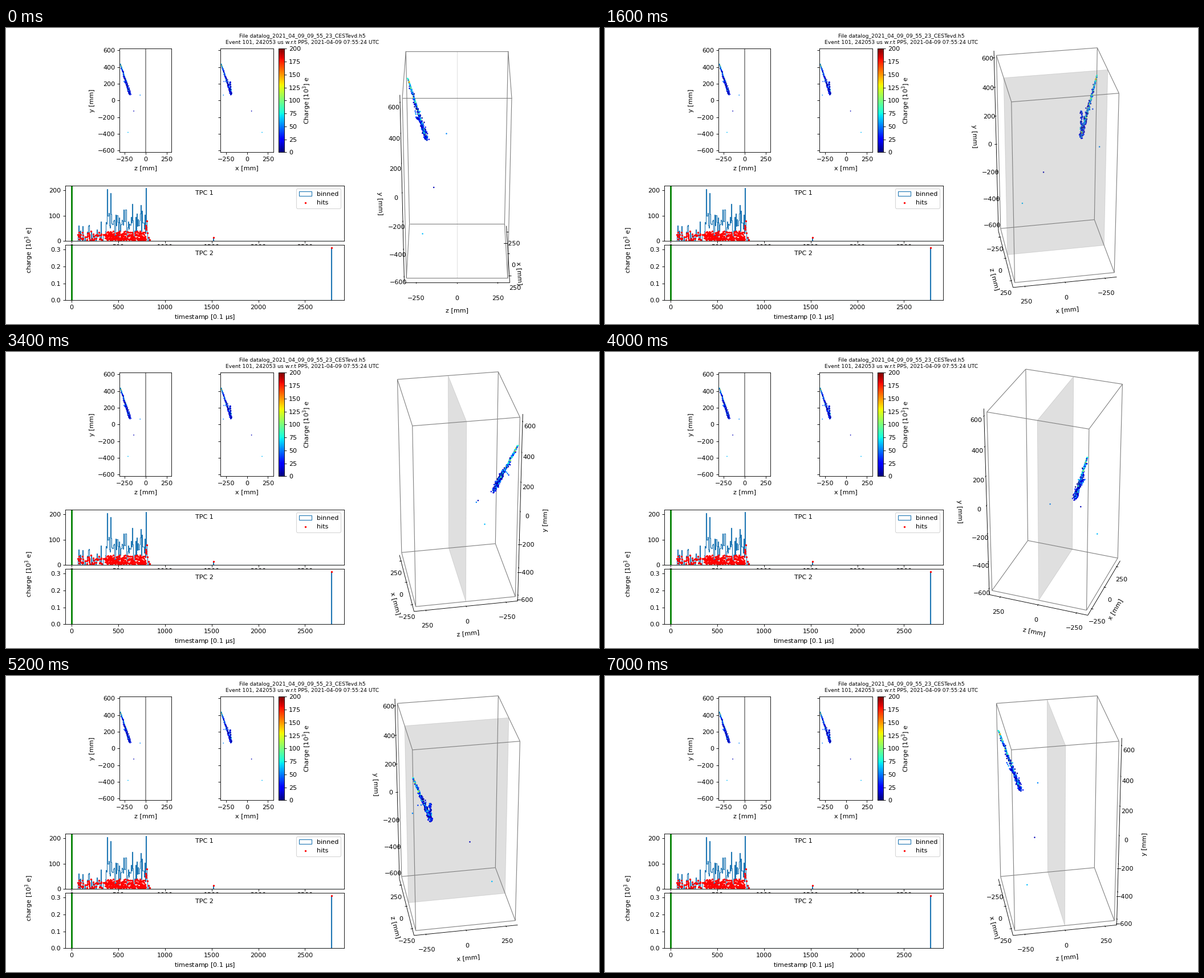
Animation, 1040 px wide and 520 px high, one loop 7.2 s. Source, as a matplotlib script:

```python
import numpy as np
import matplotlib.pyplot as plt
from matplotlib.animation import FuncAnimation
from matplotlib.collections import LineCollection
from matplotlib.patches import Polygon

W, H, DPI = 1040, 520, 80
FRAMES, INTERVAL = 36, 200
plt.rcParams["font.family"] = "DejaVu Sans"
rng = np.random.default_rng(101)

# World axes are ordered (x, z, y), in mm; y points up on the stage.
HALF = np.array([310.38, 310.38, 620.76])
EDGE = HALF * 25 / 24
DELTA = HALF / 6
CAMERA, FOCAL = 8311.0, 2389.2
CENTER = np.array([791.0, 241.0])
ELEV = np.radians(30)
PAD = 0.0588
TICKS = [range(-250, 251, 250), range(-250, 251, 250), range(-600, 601, 200)]
NAMES = ["x [mm]", "z [mm]", "y [mm]"]
LABEL_PAD = [25, 25, 41]
TRACK_TOP, TRACK_END = np.array([-309, -301, 436]), np.array([-188, -187, 74])

fig = plt.figure(figsize=(W / DPI, H / DPI), dpi=DPI, facecolor="white")


def pixel_axes(left, top, right, bottom):
    return fig.add_axes([left / W, 1 - bottom / H,
                         (right - left) / W, (bottom - top) / H])


def pixel_text(x, y, text, **style):
    fig.text(x / W, 1 - y / H, text, ha="center", va="center", **style)


def along_track(s, spread):
    s = s[:, None]
    jitter = rng.normal(0, 1, (len(s), 3)) * spread * (0.4 + 0.6 * s)
    return TRACK_TOP + s * (TRACK_END - TRACK_TOP) + jitter


def make_hits():
    """Return hit positions (x, z, y) and charges for the event."""
    core = along_track(np.linspace(0, 1, 170), 3)
    halo = along_track(rng.uniform(0, 1, 170) ** 0.5, 7)
    t = rng.uniform(0, 1, 75) ** 1.4
    branch = np.column_stack([-203 + 12 * t, -253 + 58 * np.sqrt(t), 222 - 145 * t])
    branch += rng.normal(0, 3, branch.shape)
    spray = np.linspace((-277, -259, 228), (-238, -254, 226), 3)
    strays = [(-283, -66, 65), (54, -142, -126), (180, -211, -382)]
    charge = np.concatenate([rng.gamma(6, 12, 170), rng.gamma(1.6, 12, 170),
                             rng.gamma(1.5, 20, 75), rng.uniform(30, 60, 3),
                             [52, 10, 62]])
    return np.vstack([core, halo, branch, spray, strays]), charge


def make_pulses():
    """Return timestamps and charges: a rising rate, a burst, a tail, a stray."""
    times = np.concatenate([rng.uniform(68, 794, 135), rng.uniform(360, 794, 200)])
    small = rng.random(times.size) < 0.4
    heights = np.where(small, rng.uniform(3, 11, times.size),
                       rng.triangular(8, 20, 40, times.size))
    return (np.concatenate([times, rng.uniform(796, 801, 4),
                            np.linspace(806, 835, 4), [1520]]),
            np.concatenate([heights, np.linspace(44.5, 60, 4),
                            np.geomspace(78, 5, 4), [13]]))


points, charge = make_hits()
colors = plt.get_cmap("jet")(np.clip(charge / 200, 0, 1))

fig.suptitle("File datalog_2021_04_09_09_55_23_CESTevd.h5\n"
             "Event 101, 242053 us w.r.t PPS, 2021-04-09 07:55:24 UTC",
             fontsize="small")

# Flat projections
zy = pixel_axes(199.4, 36.4, 290.4, 218.4)
xy = pixel_axes(376.4, 36.4, 469, 218.4)
for ax, column, half in ((zy, 1, 310.4), (xy, 0, 316)):
    ax.scatter(points[:, column], points[:, 2], s=2.4, c=colors, linewidths=0)
    ax.set(xlim=(-half, half), ylim=(-HALF[2], HALF[2]),
           xticks=TICKS[0], yticks=TICKS[2], xlabel=NAMES[column])
zy.axvline(0, color="gray")
xy.set_yticklabels([])
pixel_text(151.5, 127.5, "y [mm]", rotation=90)

bar = pixel_axes(478, 36.4, 488, 218.4)
bar.imshow(np.linspace(0, 1, 256)[:, None], cmap="jet", origin="lower",
           aspect="auto", extent=(0, 1, 0, 200))
bar.set(xticks=[], yticks=range(0, 201, 25))
bar.yaxis.tick_right()
pixel_text(528, 127, "Charge [$10^3$] e", rotation=90)

# Charge against time
tpc1 = pixel_axes(104, 276.7, 593, 373.8)
tpc2 = pixel_axes(104, 381.3, 593, 478.4)
bins = np.arange(60, 2900, 7)
for ax, (times, heights), top, name, name_y in (
        (tpc1, make_pulses(), 219.5, "TPC 1", 290),
        (tpc2, ([2781], [0.31]), 0.326, "TPC 2", 396)):
    ax.hist(times, bins=bins, weights=heights, histtype="step", color="C0",
            label="binned")
    ax.scatter(times, heights, s=9, color="r", linewidths=0, label="hits", zorder=3)
    ax.axvline(0, color="green", lw=2.5)
    ax.set(xlim=(-65, 2918), ylim=(0, top))
    pixel_text(348, name_y, name)
tpc1.legend(loc="upper right")
tpc1.tick_params(axis="x", pad=2)
tpc2.set_xlabel(r"timestamp [0.1 $\mathrm{\mu}$s]")
pixel_text(41, 390, "charge [$10^3$ e]", rotation=90)

# Rotating view, drawn in stage pixels
view = pixel_axes(560, 26, W, 468)
view.set(xlim=(560, W), ylim=(468, 26))
view.axis("off")
signs = np.array([(i, j, k) for i in (-1, 1) for j in (-1, 1) for k in (-1, 1)])
box_edges = [(a, b) for a in range(8) for b in range(a + 1, 8)
             if np.sum(signs[a] != signs[b]) == 1]
plane_corners = HALF * [(-1, 0, -1), (1, 0, -1), (1, 0, 1), (-1, 0, 1)]

box = LineCollection([], colors="gray", linewidths=1, zorder=1)
axis_lines = LineCollection([], colors="black", linewidths=0.8, zorder=5,
                            clip_on=False)
view.add_collection(box, autolim=False)
view.add_collection(axis_lines, autolim=False)
plane = Polygon(np.zeros((4, 2)), facecolor="gray", edgecolor="gray",
                alpha=0.25, lw=0.8, zorder=2)
view.add_patch(plane)
cloud = view.scatter(np.zeros(len(points)), np.zeros(len(points)), s=5,
                     c=colors, linewidths=0)
tick_texts = [[view.text(0, 0, str(v).replace("-", "−"), ha="center", va="top",
                         zorder=6) for v in values] for values in TICKS]
name_texts = [view.text(0, 0, name, ha="center", va="center", zorder=6)
              for name in NAMES]


def project(p, azim):
    """Return stage pixels and nearness to the camera."""
    p = np.asarray(p, float)
    across = -p[..., 0] * np.sin(azim) + p[..., 1] * np.cos(azim)
    toward = p[..., 0] * np.cos(azim) + p[..., 1] * np.sin(azim)
    near = toward * np.cos(ELEV) + p[..., 2] * np.sin(ELEV)
    up = p[..., 2] * np.cos(ELEV) - toward * np.sin(ELEV)
    scale = FOCAL / (CAMERA - near)
    return CENTER + np.stack([across, -up], -1) * scale[..., None], near


def place_axis(index, side, tick_dir, azim):
    """Place one axis' texts and return its line and tick segments."""
    side = np.array(side, float)
    middle = side * EDGE
    along = np.eye(3)[index]
    line, _ = project([middle - along * EDGE, middle + along * EDGE], azim)
    segments = [line]
    outward = np.eye(3)[tick_dir] * side * DELTA
    for value, text in zip(TICKS[index], tick_texts[index]):
        base = middle + along * value
        segments.append(project([base - 0.1 * outward, base + 0.2 * outward], azim)[0])
        text.set_position(project(base + side * DELTA * 11.5 * PAD, azim)[0])
    name = name_texts[index]
    name.set_position(project(middle + side * DELTA * LABEL_PAD[index] * PAD, azim)[0])
    dx, dy = line[1] - line[0]
    angle = np.degrees(np.arctan2(-dy, dx)) % 180
    name.set_rotation(angle - 180 if angle > 90 else angle)
    return segments


def update(frame):
    azim = np.radians(frame * 360 / FRAMES)
    near_x = 1 if np.cos(azim) > -1e-9 else -1
    near_z = 1 if np.sin(azim) > -1e-9 else -1

    corners, _ = project(signs * HALF, azim)
    box.set_segments([corners[[a, b]] for a, b in box_edges])
    outline, plane_near = project(plane_corners, azim)
    plane.set_xy(outline)

    spots, near = project(points, azim)
    order = np.argsort(near)
    cloud.set_offsets(spots[order])
    cloud.set_facecolors(colors[order])
    cloud.set_zorder(3 if near.max() > plane_near.max() else 1.5)

    axis_lines.set_segments(place_axis(0, (0, near_z, -1), 1, azim)
                            + place_axis(1, (near_x, 0, -1), 0, azim)
                            + place_axis(2, (near_x, -near_z, 0), 0, azim))
    return []


anim = FuncAnimation(fig, update, frames=FRAMES, interval=INTERVAL, repeat=True)
plt.show()
```
